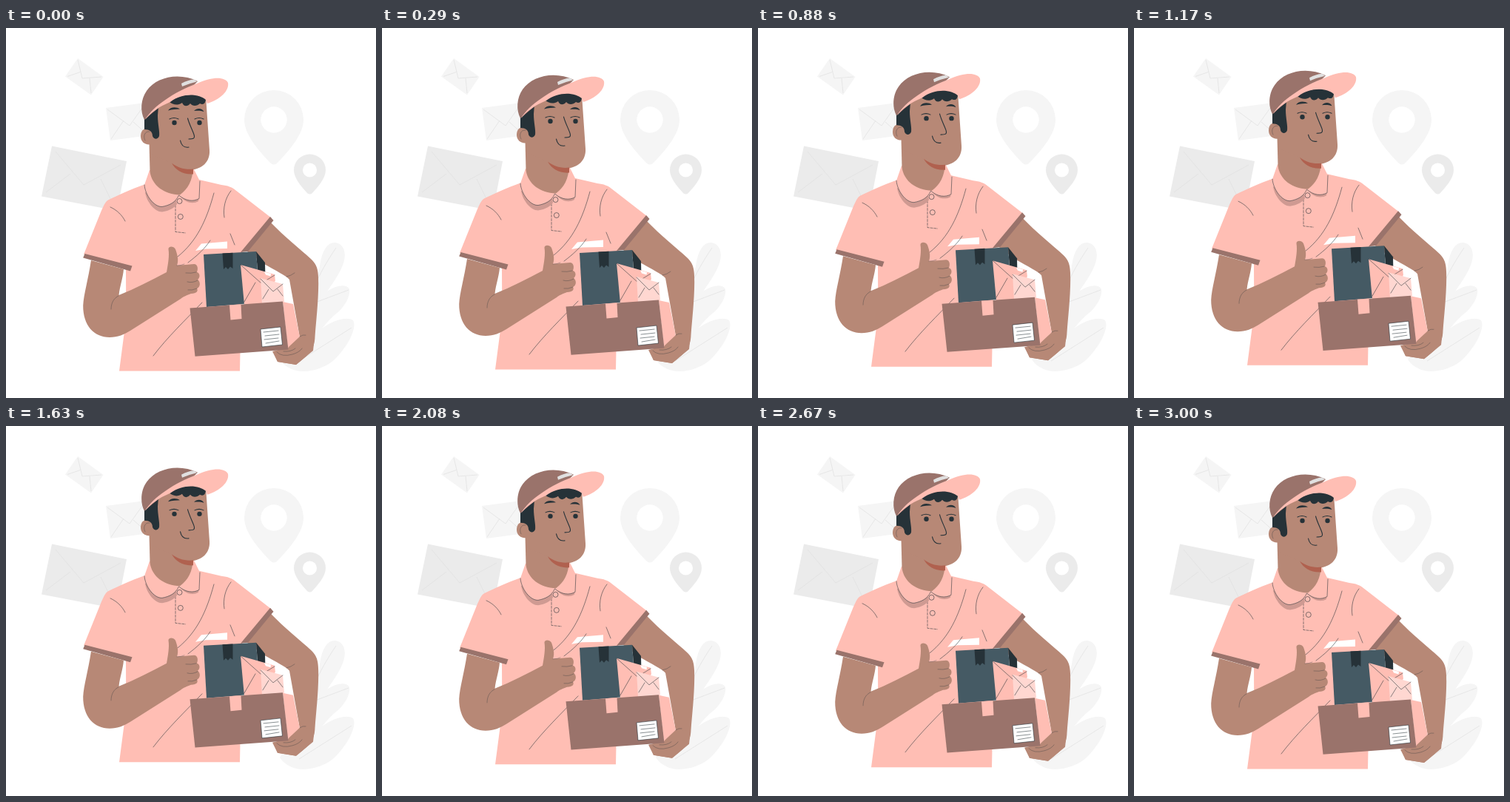
An HTML page for the animation above (3040 ms loop, 500 by 500 pixels).

```html
<!DOCTYPE html>
<html lang="en">
<head>
<meta charset="utf-8">
<title>Courier</title>
<style>
  html, body { margin: 0; width: 100%; height: 100%; overflow: hidden; background: #fff; }
  svg { display: block; width: 100%; height: 100%; }
  .pale { fill: #f5f5f5; }
  .grey { fill: #ebebeb; }
  .vein { fill: none; stroke: #e0e0e0; stroke-width: .7; }
  .skin { fill: #b78876; }
  .pink { fill: #ffbeb4; }
  .brown { fill: #9a736b; }
  .dark { fill: #263238; }
  .white { fill: #fff; }
  .line { fill: none; stroke: #263238; stroke-width: .55; stroke-linecap: round; stroke-linejoin: round; }
  .edged { stroke: #263238; stroke-width: .6; stroke-linejoin: round; }
  .bold { stroke-width: 1.1; }
  .faint { stroke-opacity: .6; }
  .stitch { stroke-dasharray: 4 1; stroke-linecap: butt; }
</style>
</head>
<body>
<svg viewBox="0 0 500 500">
  <g id="backdrop">
    <path class="pale" d="M97 41L131.500 66 115 90.500 80 65.500Z"/>
    <path class="vein" d="M97 43L103 68 129 66M83 65.500L100.500 59.500M113 68L115 88"/>
    <path class="pale" d="M135 108L188 101 194 145 141 152Z"/>
    <path class="vein" d="M137 110L167 132 187 104M142 150L159 125M172 127L190 143"/>
    <path class="grey" d="M62 159.500L163 180 150 247 48 227.500Z"/>
    <path class="vein" d="M67 167L105 212 155 185M54 222L87 197M128 204L146 241"/>
    <path class="pale" d="M322 124A40 40 0 0 1 402 124C402 144 382 166 368 181Q362 188 356 181C342 166 322 144 322 124Z"/>
    <circle class="white" cx="362" cy="124" r="17.700"/>
    <path class="grey" d="M389 192A21.500 21.500 0 0 1 432 192C432 203 422 214 414 223Q410.500 226 407 223C399 214 389 203 389 192Z"/>
    <circle class="white" cx="410.500" cy="192" r="9.500"/>
    <path class="pale" d="M400 400C418 360 420 340 424 322C427 300 435 289 445 290C458 292 460 306 456 318C451 332 442 344 434 356C445 348 460 345 464 353C466 364 455 380 445 387C438 393 434 398 427 406C440 396 460 389 469 395C475 405 462 430 445 447C430 462 402 468 386 461C378 457 374 454 370 448Z"/>
    <path class="vein" d="M446 297C436 312 428 325 420 342M463 354L415 372M467 405L396 450"/>
  </g>

  <g id="courier">
    <!-- far arm -->
    <path class="skin" d="M357 262C376 282 398 299 413 313C421 321 422.300 328 422.200 345C422 372 419 396 417.500 417C417 434 410 441 392 455L367 451 360 437 383 431 397 418 383 340C379 335 365 328 347 318L326 302Z"/>
    <path class="line faint" d="M379 336Q385 335 390 331"/>

    <!-- shirt -->
    <path class="pink" d="M187 211.500C169 218 151 226 138 232.500C134 235 132 240 128 249L105 306 170 324 162 326C162 350 163 385 160 410L153 463.500 316 463.500 319 303 359 257 310 219C305 215 300 213 291 212L261 205Z"/>
    <path class="brown" d="M106.500 305L170.500 321.500 168 328.500 104.200 310.500Z"/>
    <path class="brown" d="M357 255L361.500 260 327 302 317 303Z"/>
    <path class="white" d="M256 301L264 291.500 299 288.500 299 298 270 298.500Z"/>
    <path class="line" d="M281 223C271 260 258 288 232 309M276 287C269 298 258 308 246 317M265 371C243 394 218 418 199 443M304 220C296 230 293 244 295 256M141 242C150 246 157 253 161 261M303 278L309 293"/>
    <path class="line stitch" d="M229 234V275.500L243 277"/>

    <!-- neck and collar -->
    <path fill="#cf9a92" d="M188 222C190 235 201 248.500 211 248.500C221 247 228 243 231 238L229 229ZM236 228L261 227 260 234C253 238 244 237 236 228Z"/>
    <path class="pink" d="M194 192L187 212C188 226 200 242 211 241.500C221 239.500 229 236 233.500 226C243 234 253 235 261 230.500L262 207 254 191Z"/>
    <path class="skin" d="M193 135L194.500 194C197 213 214 225 235 225.500C246 217 252 207 253 188L250 150Z"/>
    <path class="line" d="M187 212C188 226 200 242 211 241.500C221 239.500 229 236 233.500 226C243 234 253 235 261 230.500L262 207"/>
    <g class="pink edged">
      <circle cx="234.500" cy="234" r="3.500"/>
      <circle cx="235.800" cy="255" r="3.500"/>
    </g>

    <!-- head -->
    <path class="skin" d="M196 118L215 98 270 92 275 165C276 181 265 191 248 192C238 192 230 188 224 183L194 170Z"/>
    <path fill="#b0614f" d="M224 182.500C232 189 243 192 253 190.500V197.500C240 198.500 229 192.500 224 182.500Z"/>
    <path class="skin" d="M197 138C190 132.500 182 137 182 146C182 154 188 159 197 157Z"/>
    <path class="line faint" d="M194 140C187 139 185 147 188 152"/>
    <path class="dark" d="M187 137L187 123 206 106 205 118C205 130 208 140 207 146C205 151 200 151 198 146C198 140 194 137 187 137Z"/>
    <path class="dark" d="M221 100C232 90 255 86 270 95C270 100 268 105 262 102C258 106 252 106 249 102C245 107 240 106 238 101C232 105 226 104 221 100Z"/>
    <path class="brown" d="M187 124C181 113 182 96 190 85C203 66 234 59.500 259 72L245 86 206 108Z"/>
    <path class="pink" d="M188 124C198 106 228 86 258 75C280 65 296 66 300 74C302 85 289 97 272 102L270 97C261 89 239 87 222 100C207 106 195 115 188 124Z"/>
    <path fill="#e0e0e0" d="M237 75Q246 70 254 69.500L258 72.500Q247 75 238 79Z"/>
    <path class="dark" d="M219 111.500C222 106.500 230 106 235 109.500C230 110 225 109.500 219 111.500ZM254 112C258 107.500 265 108 267.500 113C263 111.500 259 111.500 254 112Z"/>
    <path class="line bold" d="M221 123Q227 120 233 123M255 123Q261 120 267 123M245.500 122C248 131 252 138 254 144C256 150 252 150 247 150"/>
    <path class="line bold" d="M235.500 152C237 159 241 162 247 161"/>
    <circle class="dark" cx="227.500" cy="128" r="3.200"/>
    <circle class="dark" cx="261.500" cy="128" r="3.200"/>

    <!-- raised thumb -->
    <path class="skin" d="M115 314C111 340 105 360 104.200 375C104 402 119 418 140 418C151 418 160 414 168 409L236 366C239 363 245 361 250 359C258 359 260 355 258 352C263 350 263 343 259 340C263 337 262 331 258 330C260 325 259 319 254 319L231 321C234 313 231 305 229 299C226 294 219 295 219.500 299C221 308 219 319 217 330C196 341 175 352 152.500 361C154 348 158 338 159 326Z"/>
    <path class="line faint" d="M142 380C142 371 146 365 152 362M257 330Q250 332 243 331M259 341Q252 345 245 343M258 352Q251 355 246 354M231 321Q237 321 241 319"/>

    <!-- parcels -->
    <path class="dark" d="M338 302L350 317 351 365 343 371Z"/>
    <path fill="#455a64" d="M267 306L338 302 343 371 271 377Z"/>
    <path class="dark" d="M292.500 304.500L306.500 303.700 306.500 325 303 322.500 300 326 297 323 294 326Z"/>
    <path class="pink" d="M317 320L363 333 367 371 322 374Z"/>
    <path class="line" d="M322 370L337 344M317 320L345 345 363 334M352 341L361 346"/>
    <path class="white" d="M349 329.500L358 332 357.500 335.500 351 333.500ZM363 342L371 344 372 348 364 347Z"/>
    <path fill="#ffd7d1" d="M344 338L374 346 376 370 346 373Z"/>
    <path class="line" d="M344 339L361 356 374 346M347 366L355 353M374 362L367 353"/>
    <path class="pink" d="M374 370L388 373 397 418 381 435Z"/>
    <path class="skin" d="M397 417L383 430C379 434 382 437 374 437L361 437 367 451 392 455 415 436 417 418Z"/>
    <path class="brown" d="M248.500 378.500L374 369.500 381.500 434.500 255.500 443.700Z"/>
    <path class="pink" d="M302 374.500L317.500 373.500 318.500 393 303.500 394.500Z"/>
    <path class="white edged" d="M344 407L371 404 373.500 428 346 431Z"/>
    <path class="line" d="M348 411L368 409M350 416L369 414M349 421L368 419M351 426L369 423"/>
    <path class="line faint" d="M366 438Q373 445 387 441C394 439 398 436 400 433M375 437Q385 438 391 433M397 417Q401 414 405 415"/>
  </g>
</svg>
<script>
  const LOOP = 3040, BOB = 3000, HEIGHT = 10;
  const courier = document.getElementById('courier');
  const start = performance.now();

  // Steady rise for half the bob, steady fall, then a brief rest.
  function render(time) {
    const p = Math.min(time % LOOP, BOB) / BOB;
    const lift = HEIGHT * (1 - Math.abs(2 * p - 1));
    courier.setAttribute('transform', `translate(0 ${-lift.toFixed(3)})`);
  }

  function tick() {
    render(performance.now() - start);
    requestAnimationFrame(tick);
  }
  tick();
</script>
</body>
</html>
```
